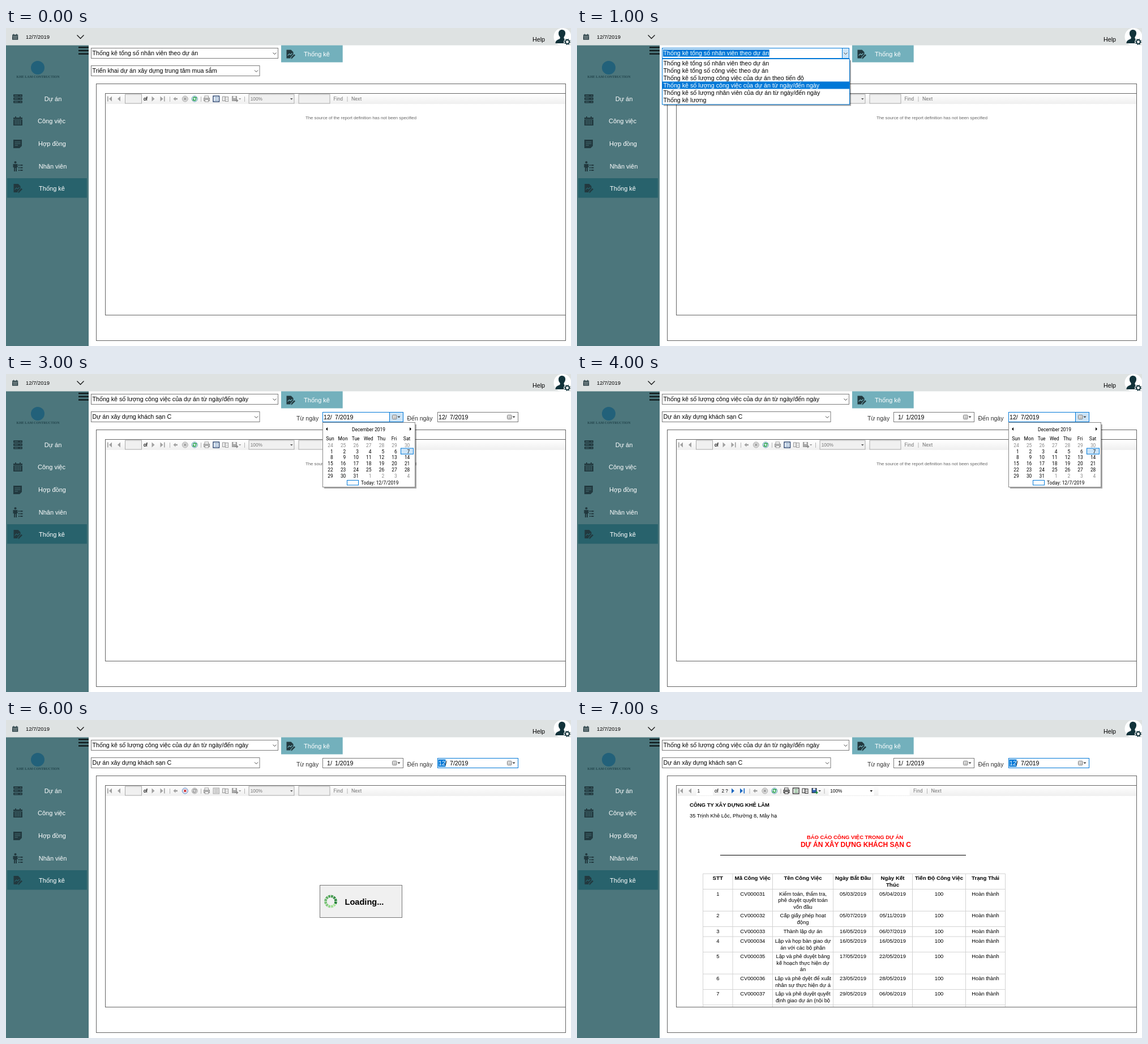
An HTML page for the animation above (8000 ms loop, 998 by 561 pixels).

```html
<!DOCTYPE html>
<html lang="vi">
<head>
<meta charset="utf-8">
<title>Thống kê</title>
<style>
html, body { margin: 0; width: 100%; height: 100%; overflow: hidden; background: #fff; }
svg { display: block; width: 100%; height: 100%; }
text { font-family: "Liberation Sans", Arial, sans-serif; }
text.ui { font-family: Roboto, "Open Sans", sans-serif; }
text.mark { font-family: "Liberation Serif", serif; }
</style>
</head>
<body>
<svg id="stage" viewBox="0 0 998 561" preserveAspectRatio="none"><g id="base"></g><g id="live"></g></svg>
<script>
const INK = '#22393f', BLUE = '#0078d7', PALE = '#cce4f7', TEAL = '#4c767c', GREY = '#a0a0a0', EDGE = '#646464';
const REPORTS = [
  'Thống kê tổng số nhân viên theo dự án',
  'Thống kê tổng số công việc theo dự án',
  'Thống kê số lượng công việc của dự án theo tiến độ',
  'Thống kê số lượng công việc của dự án từ ngày/đến ngày',
  'Thống kê số lượng nhân viên của dự án từ ngày/đến ngày',
  'Thống kê lương'];
const PROJECTS = [
  'Triển khai dự án xây dựng trung tâm mua sắm',
  'Dự án xây dựng khách sạn C',
  'Dự án xây chung cư cao cấp A (Xây dựng)',
  'Thiết kế thi công khách sạn B (Xây lắp)',
  'Thiết kế thi công nội thất (Kiến trúc)',
  'Thi công trường học',
  'Dự án xây dựng canteen',
  'Dự án quy hoạch khu dân cư'];
const TASKS = [
  ['Kiểm toán, thẩm tra,|phê duyệt quyết toán|vốn đầu', '05/03/2019', '05/04/2019'],
  ['Cấp giấy phép hoạt|động', '05/07/2019', '05/11/2019'],
  ['Thành lập dự án', '16/05/2019', '06/07/2019'],
  ['Lập và họp bàn giao dự|án với các bộ phận', '16/05/2019', '16/05/2019'],
  ['Lập và phê duyệt bảng|kế hoạch thực hiện dự|án', '17/05/2019', '22/05/2019'],
  ['Lập và phê dyệt để xuất|nhân sự thực hiện dự á', '23/05/2019', '28/05/2019'],
  ['Lập và phê duyệt quyết|định giao dự án (nội bộ', '29/05/2019', '06/06/2019']];

const rect = (x, y, w, h, fill, stroke, more = '') =>
  `<rect x="${x}" y="${y}" width="${w}" height="${h}" fill="${fill}"${stroke ? ` stroke="${stroke}"` : ''} ${more}/>`;
const path = (d, fill = 'none', stroke = 'none', w = 1) =>
  `<path d="${d}" fill="${fill}" stroke="${stroke}" stroke-width="${w}"/>`;
const circle = (x, y, r, fill, stroke = 'none', w = 1, more = '') =>
  `<circle cx="${x}" cy="${y}" r="${r}" fill="${fill}" stroke="${stroke}" stroke-width="${w}" ${more}/>`;
const text = (x, y, s, size = 10.7, fill = '#000', more = '') =>
  `<text x="${x}" y="${y}" font-size="${size}" fill="${fill}" ${more}>${s}</text>`;
const at = (x, y, s) => `<g transform="translate(${x} ${y})">${s}</g>`;
const MID = 'text-anchor="middle"', END = 'text-anchor="end" class="ui"', BOLD = 'font-weight="bold"';

const docIcon = (x, y, back) => at(x, y,
  path('M0 0H8L12 4V8L7 13V15H0Z', INK) + path('M2 10L5 7L7 9L10 6', 'none', back, 1.2) +
  path('M9 14.2L14.6 8.6', 'none', INK, 2.6) + path('M8 16L8.4 13.6L10.2 15.4Z', INK));

function calIcon(x, y, s, back) {
  let dots = '';
  for (let r = 0; r < 3; r++) for (let c = 0; c < 4; c++) dots += rect(2.5 + c * 3, 7 + r * 2.7, 1.8, 1.5, back);
  return `<g transform="translate(${x} ${y}) scale(${s})">` + rect(0, 2, 16, 14, INK) +
    rect(3, 0, 2, 4, INK) + rect(11, 0, 2, 4, INK) + path('M0 5.2H16', 'none', back, .8) + dots + '</g>';
}

function sidebar() {
  let s = rect(0, 30.5, 146, 530.5, TEAL) + rect(2, 265, 141, 34.5, '#28626c');
  for (const y of [33, 38.7, 44.4]) s += rect(128, y, 18, 2.4, '#10191b');
  s += circle(56, 70, 12, '#22617a') + text(56.5, 88, 'KHE LAM CONTRUCTION', 6, '#23454c', `${MID} class="mark" ${BOLD}`);
  const items = [['Dự án', 83, 125], ['Công việc', 80.5, 164], ['Hợp đồng', 81.5, 204], ['Nhân viên', 82.5, 244], ['Thống kê', 81, 283]];
  for (const [label, x, y] of items) s += text(x, y + 4, label, 11, '#fff', MID);
  for (const y of [117, 122.6, 128.2])
    s += rect(13, y, 16, 4.4, INK, '', 'rx="1"') + path(`M15 ${y + 2.2}h6M25 ${y + 2.2}h2`, 'none', TEAL, .8);
  s += calIcon(13, 156, 1, TEAL);
  s += path('M13 197H28V208L24 212H13Z', INK) + path('M15.5 201H25.5M15.5 204H25.5M15.5 207H21', 'none', TEAL, .9);
  s += circle(16.5, 237, 2.1, INK) + path('M12.5 240H20.5V246H19V253H17V247H16V253H14V246H12.5Z', INK);
  for (const y of [242, 246.5, 251]) s += rect(22, y - 1, 2, 2, INK) + rect(25, y - 1, 4.5, 2, INK);
  return s + docIcon(13.5, 275, '#28626c');
}

function header() {
  return rect(0, 0, 998, 30.5, '#dee2e2') + calIcon(11, 10.5, .64, '#dee2e2') +
    text(35, 19, '12/7/2019', 9.45) + path('M125.5 12.5L131.5 18.5L137.5 12.5', 'none', '#111', 1.3) +
    text(930, 24, 'Help', 10.7) + circle(983, 15.5, 15.5, '#fff') +
    path('M982 3C986 3 988.5 6 988 10C987.7 13 986.5 14.5 985.5 16C985 19 987 20 989 21V27H970.5C970.5 22 974 21 977.5 19.5C979 18.5 979 17 978.3 15.5C976.8 14 976 12 976 9.5C976 5.5 978.5 3 982 3Z', '#12333b') +
    circle(991.5, 24.5, 6.4, '#fff') + circle(991.5, 24.5, 3.4, 'none', '#12333b', 2) +
    circle(991.5, 24.5, 4.9, 'none', '#12333b', 1.4, 'stroke-dasharray="1.9 1.95"');
}

const combo = (y, w, label, open) =>
  rect(150.5, y + .5, w, 18, '#fff', open ? BLUE : '#7a7a7a') +
  (open ? rect(150.5 + w - 12, y + .5, 12, 18, PALE, BLUE) : '') +
  path(`M${w + 141.5} ${y + 8.5}l3 3l3 -3`, 'none', '#444') +
  (open ? `<g class="sel">${text(152.5, y + 13, label, 10.7, '#fff')}</g>` : text(152.5, y + 13, label));

function list(y, w, items, on) {
  const h = items.length * 13.15 + 1.5;
  let s = rect(153, y + 3, w, h, '#000', '', 'opacity=".35"') + rect(150.5, y + .5, w, h, '#fff', BLUE);
  items.forEach((item, i) => {
    const top = y + 1 + i * 13.15;
    if (i === on) s += rect(151, top, w - 1, 13, BLUE);
    s += text(152.5, top + 10.7, item, 10.7, i === on ? '#fff' : '#000');
  });
  return s;
}

function dateBox(x, month, day, mode) {
  const hot = mode === 'open';
  let s = rect(x + .5, 67.5, 142, 17, '#fff', mode ? BLUE : '#7a7a7a');
  if (hot) s += rect(x + 118.5, 67.5, 24, 17, PALE, BLUE);
  if (mode === 'pick') s += rect(x + 1.5, 69.5, 13, 13, BLUE);
  const left = x + (month.length > 1 ? 2 : 8);
  s += text(left, 80, mode === 'pick' ? `<tspan fill="#fff">${month}</tspan>/` : month + '/', 10.6) + text(x + 22, 80, day + '/2019', 10.6);
  return s + rect(x + 123.5, 72.5, 7.5, 7, '#e6e6e6', '#777', 'rx="1"') +
    path(`M${x + 125} 75.5h5M${x + 125} 77.5h5`, 'none', '#999', .7) +
    path(`M${x + 132.5} 74.5h5l-2.5 3z`, '#444');
}

function calendar(x) {
  let s = rect(x + 3, 89, 163, 113, '#000', '', 'opacity=".35"') + rect(x + .5, 85.5, 163, 114, '#fff', '#888') +
    path(`M${x + 9} 94v6l-3 -3zM${x + 154} 94v6l3 -3z`, '#000') +
    text(x + 81.5, 100.5, 'December 2019', 8.4, '#000', `${MID} class="ui"`) + rect(x + 138.5, 131, 22, 10.3, PALE, BLUE);
  'Sun Mon Tue Wed Thu Fri Sat'.split(' ').forEach((d, c) =>
    s += text(x + 13.5 + c * 22.6, 116.8, d, 8.5, '#000', `${MID} class="ui"`));
  for (let i = 0; i < 42; i++) {
    const n = i - 6, day = n < 1 ? n + 30 : n > 31 ? n - 31 : n;
    s += text(x + 18.7 + (i % 7) * 22.6, 128.6 + Math.floor(i / 7) * 10.9, day, 8.4, n < 1 || n > 31 ? '#888' : '#000', END);
  }
  return s + rect(x + 43.5, 187.5, 20, 8.5, '#fff', BLUE) + text(x + 68, 195, 'Today: 12/7/2019', 8.4, '#000', 'class="ui"');
}

const separator = x => path(`M${x} 121V130`, 'none', '#b5b5b5');
const arrow = (x, dir, color) => path(`M${x - 2.5 * dir} 120.5V129.5L${x + 2.5 * dir} 125Z`, color);

function toolbar(ready, busy) {
  const d = ready ? 15.5 : 0, nav = ready ? '#1765c0' : GREY, dark = ready ? '#333' : '#999';
  let s = rect(176, 116, 813, 18, 'url(#bar)') + rect(179, 120.5, 1.6, 9, GREY) + arrow(184.5, -1, GREY) + arrow(199.5, -1, GREY);
  s += ready ? rect(211, 117, 29, 16, '#fff') + text(212.5, 128, '1', 8.3) : rect(210.5, 117, 29, 16, '#f0f0f0', '#adadad');
  s += text(243, 128, 'of', 8.3, '#000', ready ? '' : 'stroke="#000" stroke-width=".2"') + (ready ? text(255.5, 128, '2 ?', 8.2) : '');
  let t = arrow(260, 1, nav) + arrow(275, 1, nav) + rect(279, 120.5, 1.6, 9, nav) + separator(289.5);
  t += path('M295.5 125L299.5 121.5V123.8H303V126.2H299.5V128.5Z', GREY);
  t += circle(316.3, 125, 5, busy ? '#e8f0fb' : '#ddd', busy ? '#5b86c4' : '#aaa') +
    path('M314.3 123l4 4m0 -4l-4 4', 'none', busy ? '#cf2020' : '#999', 1.6);
  const live = !busy;
  t += circle(333.2, 125, 5, live ? '#e4f2f4' : '#ddd', live ? '#5b98b4' : '#aaa') +
    path('M330.6 124.6a2.7 2.7 0 0 1 4.8 -1.4M335.8 125.4a2.7 2.7 0 0 1 -4.8 1.4', 'none', live ? '#159a35' : '#999', 1.4) +
    path('M336.6 121.5v3h-3zM329.8 128.5v-3h3z', live ? '#159a35' : '#999');
  t += separator(344.5) + rect(351, 120, 6.5, 4, '#fff', dark) + rect(349.5, 123.5, 10, 5, ready ? '#999' : '#bbb', dark) + rect(351.5, 126.5, 6, 3.5, '#fff', dark);
  t += rect(366, 120, 10.5, 10, live ? '#fff' : '#ddd', live ? (ready ? '#333' : '#24406e') : '#aaa', live ? 'stroke-width="1.4"' : '') +
    path('M368.5 122.5h6M368.5 125h6M368.5 127.5h6', 'none', live ? (ready ? '#3b8a4a' : '#5d88b8') : '#bbb', 1.1);
  t += rect(382.5, 121, 4.5, 7.5, '#eee', dark) + rect(387.5, 121.5, 5, 8, '#fff', dark) + path('M389 124h2.5M389 126.5h2.5', 'none', dark, .7);
  t += rect(399.5, 120.5, 8, 8, ready ? '#2d5fae' : '#aaa', dark) + rect(401.5, 120.5, 4, 3, '#fff') + path('M404 128l5 0M407 125.8l2.5 2.2l-2.5 2.2', 'none', ready ? '#1d9b38' : '#888', 1.2);
  t += path('M411 124h4.4l-2.2 2.6z', dark) + separator(421.5);
  t += ready ? rect(429, 117, 80, 16, '#fff') + rect(517, 117, 55, 16, '#fff')
    : rect(429, 117, 80, 16, '#f0f0f0', '#adadad') + rect(517, 117, 55, 16, '#f0f0f0', '#adadad');
  t += text(431.7, 128.2, '100%', 8.3, ready ? '#000' : '#777') + path('M502 124h4.6l-2.3 2.7z', ready ? '#000' : '#555');
  t += text(578.5, 128, 'Find', 8.7, '#777', 'class="ui"') + separator(603) + text(610, 128, 'Next', 8.9, '#777', 'class="ui"');
  return s + at(d, 0, t);
}

function report() {
  let s = text(199, 153, 'CÔNG TY XÂY DỰNG KHÊ LÃM', 9.4, '#000', BOLD) +
    text(199, 171.5, '35 Trịnh Khê Lộc, Phường 8, Mây hạ', 9.4) +
    text(491, 210, 'BÁO CÁO CÔNG VIỆC TRONG DỰ ÁN', 9.43, '#f00', `${MID} ${BOLD}`) +
    text(492.5, 223.5, 'DỰ ÁN XÂY DỰNG KHÁCH SẠN C', 12.05, '#f00', `${MID} ${BOLD}`) +
    path('M253 238.5H687', 'none', '#000');
  const cols = [222.5, 275, 345.5, 452.5, 522.5, 592.5, 686.5, 756.5];
  const heads = ['STT', 'Mã Công Việc', 'Tên Công Việc', 'Ngày Bắt Đầu', 'Ngày Kết|Thúc', 'Tiến Độ Công Việc', 'Trạng Thái'];
  const rows = [heads, ...TASKS.map((t, i) => [i + 1, 'CV00003' + (i + 1), ...t, 100, 'Hoàn thành'])];
  let y = 271.2, lines = '';
  rows.forEach((row, r) => {
    let most = 1;
    row.forEach((cell, c) => {
      const parts = String(cell).split('|');
      most = Math.max(most, parts.length);
      parts.forEach((p, k) => s += text((cols[c] + cols[c + 1]) / 2, y + 11 + k * 11.5, p, r ? 9.35 : 9.7, '#000', MID + (r ? '' : ' ' + BOLD)));
    });
    lines += `M222.5 ${y}H756.5`;
    y += [0, 17.6, 27.3, 38.7][most];
  });
  lines += `M222.5 ${y}H756.5`;
  for (const x of cols) lines += `M${x} 271.2V506`;
  return path(lines, 'none', '#d3d3d3') + s;
}

function loading() {
  let s = rect(554.5, 291.5, 145, 57, '#f0f0f0', '#777');
  for (let i = 0; i < 12; i++) {
    const k = i / 11, mix = (a, b) => Math.round(a + (b - a) * k);
    s += `<path d="M-2.2 -11.3H2.2L1.5 -6.8H-1.5Z" fill="rgb(${mix(170, 30)},${mix(232, 125)},${mix(155, 50)})" transform="translate(573.5 320) rotate(${135 + i * 30})"/>`;
  }
  return s + text(598.5, 326, 'Loading...', 14.6, '#000', BOLD);
}

function view(n) {
  const dated = n >= 2, ready = n === 7, busy = n === 6;
  let s = rect(486, 30.5, 108.7, 30, n === 5 ? '#659ba6' : '#73b0bc') + docIcon(495.5, 38.5, '#73b0bc') + text(549, 50.3, 'Thống kê', 11, '#fff', MID);
  s += toolbar(ready, busy);
  if (ready) s += report();
  else if (busy) s += loading();
  else s += text(529, 161.2, 'The source of the report definition has not been specified', 7.78, '#666');
  s += rect(175.5, 115.5, 813, 391, 'none', EDGE);
  s += combo(35, 330, REPORTS[dated ? 3 : 0], n === 1) + combo(66, 297.5, PROJECTS[n > 2 ? 1 : 0], n === 2);
  if (dated) {
    s += text(513, 81.5, 'Từ ngày', 10.5, '#333') + text(708.5, 81.5, 'Đến ngày', 10.5, '#333');
    s += n > 3 ? dateBox(559, '1', '1') : dateBox(559, '12', '7', n === 3 ? 'open' : '');
    s += dateBox(762, '12', '7', n === 4 ? 'open' : n > 4 ? 'pick' : '');
  }
  if (n === 1) s += list(54, 331, REPORTS, 3);
  if (n === 2) s += list(85, 298, PROJECTS, 1);
  if (n === 3) s += calendar(559);
  if (n === 4) s += calendar(762);
  return s;
}

const base = document.getElementById('base'), live = document.getElementById('live');
base.innerHTML = '<defs><linearGradient id="bar" x2="0" y2="1"><stop stop-color="#fff"/><stop offset="1" stop-color="#efefef"/></linearGradient></defs>' +
  rect(0, 0, 998, 561, '#fff') + header() + sidebar() + rect(159.5, 98.5, 829, 453, 'none', EDGE);

let shown = -1;
function draw(ms) {
  const n = Math.floor(ms % 8000 / 1000);
  if (n === shown) return;
  shown = n;
  live.innerHTML = view(n);
  // the highlight hugs the selected words
  live.querySelectorAll('.sel').forEach(g => {
    const b = g.firstChild.getBBox();
    g.insertAdjacentHTML('afterbegin', rect(b.x - .5, b.y, b.width + 1, 12.6, BLUE));
  });
}
const start = performance.now();
function tick() {
  draw(performance.now() - start);
  requestAnimationFrame(tick);
}
tick();
</script>
</body>
</html>
```
